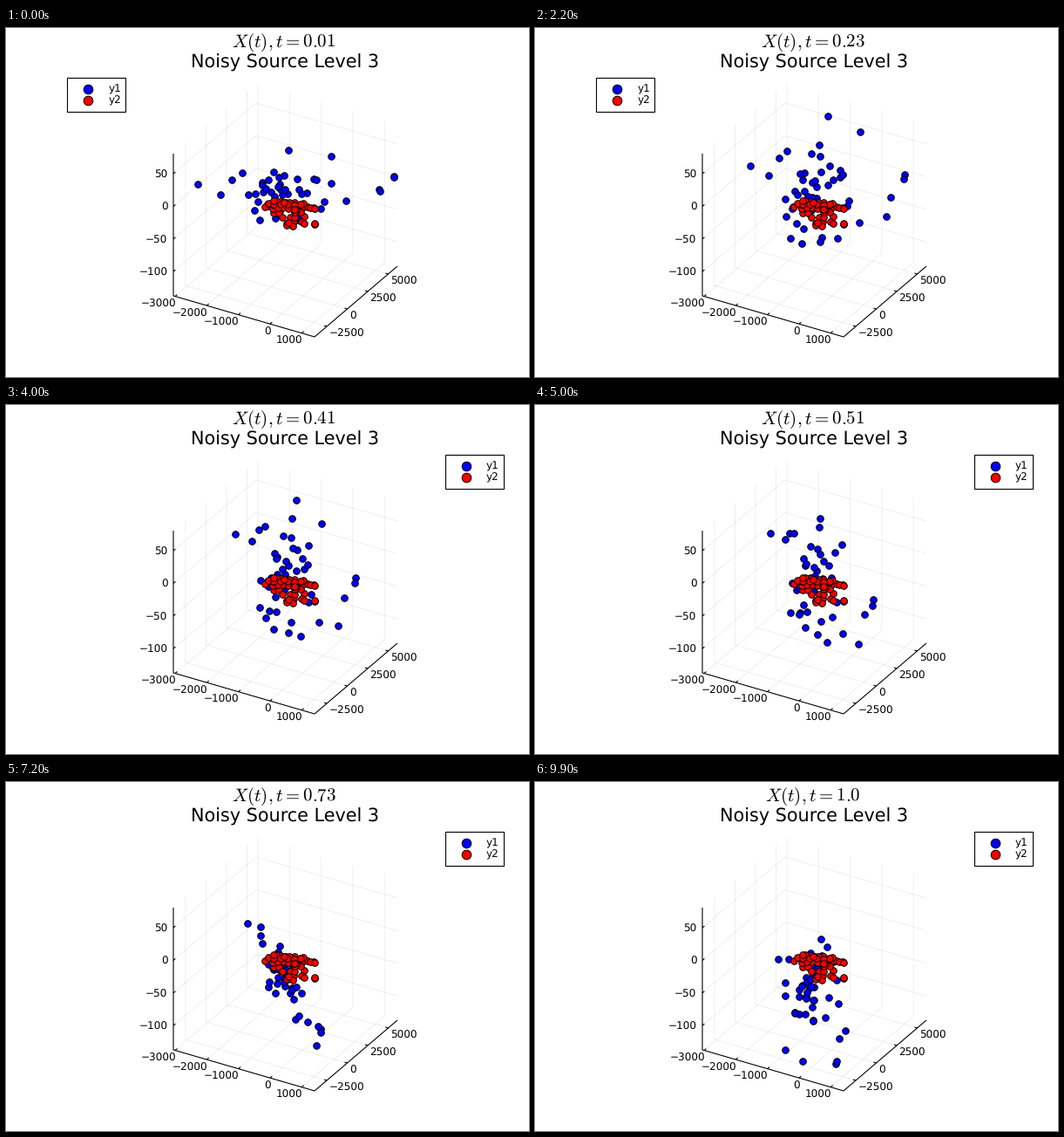
Animation, 600 px wide and 400 px high, one loop 10 s. Source, as a matplotlib script:

```python
import numpy as np
import matplotlib.pyplot as plt
from matplotlib.animation import FuncAnimation
from matplotlib.patches import Rectangle

W, H, DPI = 600, 400, 100
PT = 72 / DPI  # points per pixel
FRAMES, STEP = 100, 100
LEGEND_JUMP = 27
ORIGIN = np.array([343, 204])

plt.rcParams["font.family"] = "DejaVu Sans"
plt.rcParams["mathtext.fontset"] = "cm"
plt.rcParams["text.hinting"] = "none"

# Outlying starts: x, y and vertical speed.
OUTLIERS = [
    (220, 179, -92), (246, 191, -95), (259, 174, -136), (271, 166, -152),
    (324, 140, -270), (373, 147, -230), (345, 189, -160), (309, 218, 150),
    (445, 170, -110), (445, 171, -90), (428, 185, -35), (429, 187, 65),
    (390, 198, 75),
]


def starts(rng, count=36):
    """Outliers plus a random core whose speed grows with height."""
    x = rng.uniform(276, 374, count)
    y = np.clip(rng.normal(190, 14, count), 165, 220)
    speed = 4.5 * (y - 190) - 20 + rng.normal(0, 55, count)
    return np.vstack([OUTLIERS, np.c_[x, y, speed]]).T


def trace(x, y, speed, fine=20):
    """Follow the damped, coupled swing about the origin, one row per frame."""
    u, v, s = x - ORIGIN[0], y - ORIGIN[1], speed
    dt = 1 / (FRAMES * fine)
    rows = []
    for step in range(FRAMES * fine):
        if step % fine == 0:
            rows.append((u + ORIGIN[0], v + ORIGIN[1]))
        s = s + dt * (4 * u - 10.5 * v + 0.5 * s + 150)
        u = u + dt * (-0.95 * u - 0.3 * s - 10)
        v = v + dt * s
    return rows


def cluster(rng, count=58):
    x = np.clip(rng.normal(327, 15, count), 297, 354)
    y = 195 + 0.13 * (x - 310) + rng.gamma(2, 5, count)
    return x, np.clip(y, 191, 231)


fig = plt.figure(figsize=(W / DPI, H / DPI), dpi=DPI, facecolor="white")
ax = fig.add_axes([0, 0, 1, 1])
ax.set_xlim(0, W)
ax.set_ylim(H, 0)
ax.axis("off")


def line(*pts, width=1.1, alpha=1, z=2):
    xs, ys = zip(*pts)
    ax.plot(xs, ys, color="black", lw=width * PT, alpha=alpha, zorder=z,
            solid_capstyle="butt")


def grid(*pts):
    line(*pts, width=0.8, alpha=0.08, z=1)


def label(x, y, text, px=12, ha="left", va="center_baseline", z=7):
    return ax.text(x, y, text, fontsize=px * PT, ha=ha, va=va, zorder=z)


def tick_label(x, y, value, ha="left"):
    label(x, y, str(value).replace("-", "\u2212"), ha=ha)


def dots(xs, ys, color, size, z):
    return ax.plot(xs, ys, "o", ms=size * PT, mfc=color, mec="black",
                   mew=1.0 * PT, zorder=z)[0]


def box_axes():
    left, front, right = np.array([(192, 307), (354, 354), (449, 273)])
    across, deep, up = front - left, right - front, np.array([0, -163])

    for i, value in enumerate(range(-3000, 1001, 1000)):
        p = left + across * (2 + 36.3 * i) / across[0]
        q = p + deep
        grid(p, q, q + up)
        line(p, p + deep * 0.025)
        tick_label(p[0] + 1, p[1] + 8, value, "right")

    for i, value in enumerate(range(-2500, 5001, 2500)):
        p = front + deep * (14 + 23.5 * i) / deep[0]
        q = p - across
        grid(p, q, q + up)
        line(p, p - across * 0.019)
        tick_label(p[0] + 2.5, p[1] + 7, value)

    for i, value in enumerate(range(50, -101, -50)):
        p = np.array([192, 167 + 37.4 * i])
        q = p + deep
        grid(p, q, q + across)
        line(p, p + deep * 0.025)
        tick_label(185.5, p[1], value, "right")

    line(left + up, left, front, right)


box_axes()
label(320, 46, "Noisy Source Level 3", 20.8, "center", "baseline")
clock = label(319, 21.5, "", 20.9, "center", "baseline")

rng = np.random.default_rng(8)
path = trace(*starts(rng))
blue = dots([], [], "blue", 7.6, 4)
dots(*cluster(rng), "red", 7.6, 5)

frame = Rectangle((70, 56.5), 67, 39, fc="white", ec="black", lw=1.1 * PT,
                  zorder=6)
ax.add_patch(frame)
keys, names = [], []
for name, color, y in (("y1", "blue", 69.8), ("y2", "red", 82.8)):
    keys.append(dots([94], [y], color, 10.6, 7))
    names.append(label(117.5, y - 0.5, name))


def place_legend(x):
    frame.set_x(x)
    for key, name in zip(keys, names):
        key.set_xdata([x + 24])
        name.set_x(x + 47.5)


def update(n):
    blue.set_data(*path[n])
    clock.set_text(rf"$X(t), t = {round((n + 1) / FRAMES, 2)}$")
    place_legend(70 if n < LEGEND_JUMP else 503.5)
    return [blue, clock, frame, *keys, *names]


anim = FuncAnimation(fig, update, frames=FRAMES, interval=STEP, repeat=True,
                     repeat_delay=0, blit=False)
plt.show()
```
